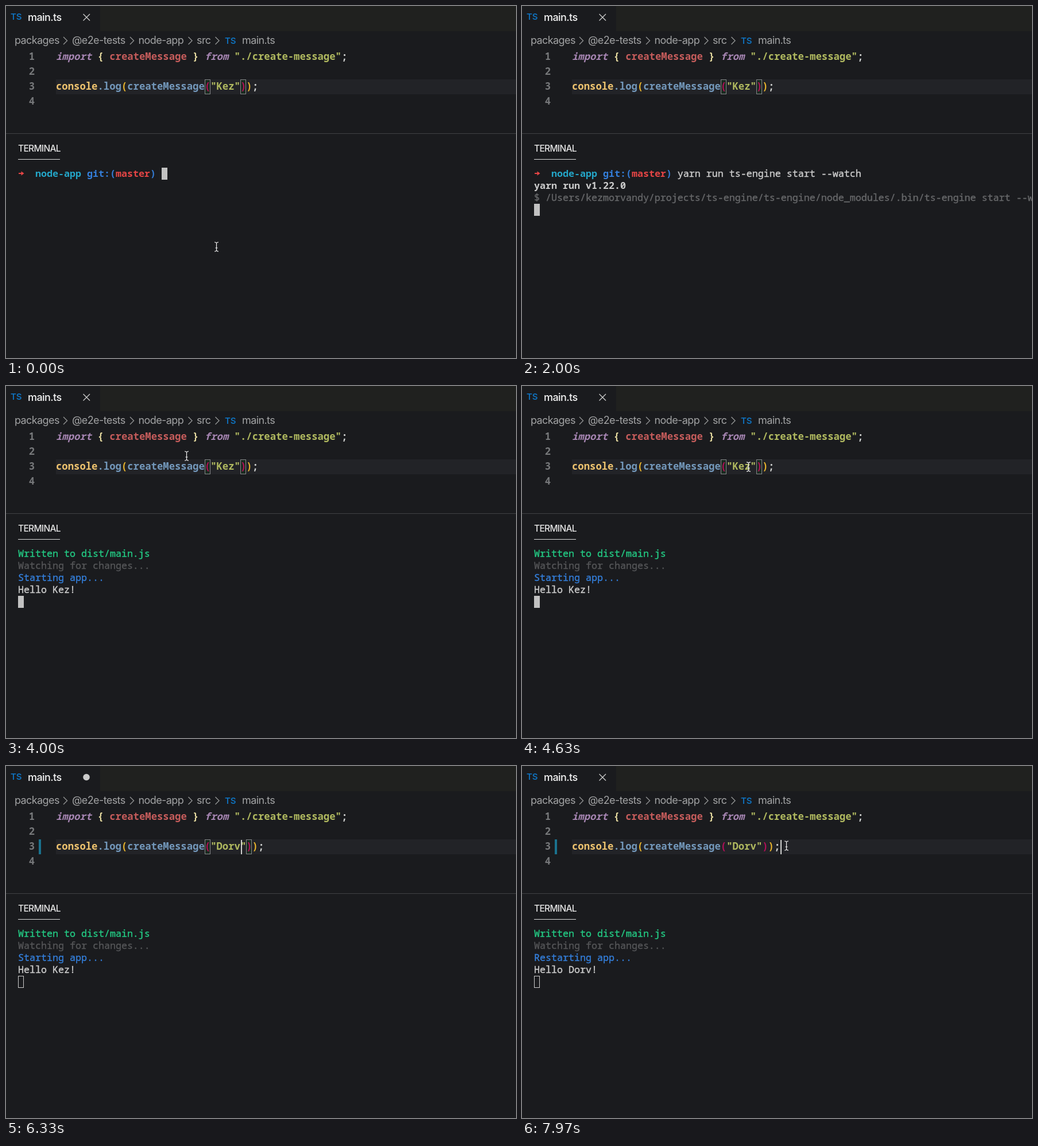
An HTML page that plays this animation: 888x614 px, repeating every 8 s.

```html
<!DOCTYPE html>
<html lang="en">
<head>
<meta charset="utf-8">
<title>Watch mode demo</title>
<style>
  html, body { margin: 0; width: 100%; height: 100%; overflow: hidden; background: #1a1b1e; }
  svg { display: block; width: 100%; height: 100%; }
  text { white-space: pre; }
  text, tspan, #arrow { fill: currentColor; }
  .ui { font: 18px Inter, sans-serif; letter-spacing: -.6px; color: #a2a3a4; }
  .tab { font-weight: 500; color: #f4f4f4; }
  .icon { font: 600 15px Inter, sans-serif; color: #0f71bd; }
  .panel { font: 500 15.5px Inter, sans-serif; letter-spacing: -.7px; color: #e4e4e4; }
  .code { font: 600 17.25px "Noto Sans Mono", monospace; color: #d0d2d1; }
  .term { font: 16.667px "Noto Sans Mono", monospace; color: #cccccc; }
  .term, .term tspan { stroke: currentColor; stroke-width: .4; }
  .num { color: #77797b; text-anchor: end; }
  .key { color: #a685b2; font-style: italic; }
  .brace { color: #e6dba0; }
  .var { color: #c55c5b; }
  .str { color: #b0b95f; }
  .obj { color: #efc46f; }
  .fn { color: #7398bb; }
  .outer { color: #e9b42c; }
  .inner { color: #b40f58; }
  .term .bold { font-weight: 700; stroke: none; }
  .red { color: #e54545; }
  .cyan { color: #24a6c8; }
  .blue { color: #347fdb; }
  .green { color: #23c983; }
  .dim { color: #666769; }
  .faint { color: #555658; }
  .line { fill: none; stroke: #c9c9c9; stroke-width: 1.4; }
</style>
</head>
<body>
<svg viewBox="0 0 888 614">
  <rect width="888" height="614" fill="#1a1b1e"/>
  <rect x="164" width="724" height="44" fill="#20211f"/>
  <text class="icon" x="8" y="24">TS</text>
  <text class="ui tab" x="38" y="26">main.ts</text>
  <path id="close" class="line" d="M134.500 14l11.500 11.500m0-11.500l-11.500 11.500"/>
  <circle id="unsaved" cx="140" cy="19.5" r="5.8" fill="#cbcbcb"/>
  <g id="crumbs"></g>

  <rect id="current" x="87" y="128" width="801" height="26" fill="#222327"/>
  <rect id="changed" x="57" y="128" width="4" height="26" fill="#1a728e"/>
  <rect id="selection" x="366.5" y="128" width="31.5" height="26" fill="#45474a"/>
  <g id="brackets" fill="#1b2a20" stroke="#85888a">
    <rect x="346.5" y="128.5" width="9" height="25"/>
    <rect id="closing" y="128.5" width="9" height="25"/>
  </g>
  <g id="numbers"></g>
  <text class="code" x="87" y="94"><tspan class="key">import</tspan> <tspan class="brace">{</tspan> <tspan class="var">createMessage</tspan> <tspan class="brace">}</tspan> <tspan class="key">from</tspan> <tspan class="str">"./create-message"</tspan>;</text>
  <text class="code" x="87" y="146"><tspan class="obj">console</tspan><tspan class="fn">.log</tspan><tspan class="outer">(</tspan><tspan class="fn">createMessage</tspan><tspan class="inner">(</tspan><tspan class="str" id="name"></tspan><tspan class="inner">)</tspan><tspan class="outer">)</tspan>;</text>
  <path id="bulb" fill="#f4b711" d="M102 116.500C98 113 98 110 98.200 109a6.800 6.800 0 0 1 13.600 0C112 111 111.500 113.500 108 116.500V121q0 1.500-1.500 1.500h-3q-1.500 0-1.500-1.500zM103.500 117.500v1.200h3v-1.200z" fill-rule="evenodd"/>
  <rect id="caret" y="129" width="2" height="25" fill="#d0d0ce"/>

  <rect y="222" width="888" height="1" fill="#414244"/>
  <text class="panel" x="21" y="254">TERMINAL</text>
  <rect x="21" y="267" width="73" height="1" fill="#dedede"/>
  <g id="screen"></g>
  <path id="arrow" class="red" d="M22 291h4.500v-2.800l5 3.800-5 3.800V293H22z"/>
  <g id="spinner" fill="#2999c9"></g>
  <rect id="block"/>
  <path id="mouse" fill="none" stroke="#f2f2f2" stroke-width="1.200" d="M-3.500-8Q0-8 0-5.500Q0-8 3.500-8M0-6V6M-3.500 8Q0 8 0 5.500Q0 8 3.500 8M-2 2H2"/>
</svg>
<script>
const LOOP = 8000, CELL = 10.35, LEFT = 87;
const FIRST = "Kez", SECOND = "Dorv";
const $ = id => document.getElementById(id);
const show = (id, on) => { $(id).style.display = on ? "" : "none"; };
const set = (id, attrs) => { for (const k in attrs) $(id).setAttribute(k, attrs[k]); };
const span = (cls, s) => `<tspan class="${cls}">${s}</tspan>`;
const within = (t, a, b) => t >= a && t < b;
const latest = (steps, t) => steps.filter(s => s[0] <= t).pop();

$("crumbs").innerHTML =
  [[15, "packages"], [115, "@e2e-tests"], [230.5, "node-app"], [332, "src"], [411, "main.ts"]]
    .map(([x, s]) => `<text class="ui" x="${x}" y="66">${s}</text>`).join("") +
  [100, 216, 317.5, 364.5]
    .map(x => `<path class="line" style="stroke:#929394" d="M${x} 54l6.500 6.500-6.500 6.500"/>`).join("") +
  `<text class="icon" x="381" y="66">TS</text>`;
$("numbers").innerHTML = [1, 2, 3, 4]
  .map(n => `<text class="code num" x="50" y="${68 + 26 * n}">${n}</text>`).join("");

const prompt = "   " + span("bold cyan", "node-app") + " " + span("bold blue", "git:(") +
  span("bold red", "master") + span("bold blue", ")") + " ";
const command = prompt + "yarn run ts-engine start --watch";
const yarn = span("bold", "yarn run v1.22.0");
const script = span("dim", "$ /Users/kezmorvandy/projects/ts-engine/ts-engine/node_modules/.bin/ts-engine start --watch");
const building = [span("green", "  Building bundle")];
const built = verb => [span("green", "Written to dist/main.js"),
  span("faint", "Watching for changes..."), span("blue", verb + " app...")];

// time, lines, cursor row, cursor column
const screens = [
  [0, [prompt], 0, 25],
  [400, [command], 0, 57],
  [950, [command], 1, 0],
  [1200, [command, yarn], 2, 0],
  [1330, [command, yarn, script], 3, 0],
  [2560, building],
  [3380, built("Starting"), 3, 0],
  [3500, [...built("Starting"), `Hello ${FIRST}!`], 4, 0],
  [6760, building],
  [7080, built("Restarting"), 3, 0],
  [7250, [...built("Restarting"), `Hello ${SECOND}!`], 4, 0]
];

// time, name, caret column
const SELECT = 4800, TYPE = 5480, SAVE = 6600, CLICK = 7700;
const edits = [
  [0, FIRST], [SELECT, FIRST, 30],
  ...[...SECOND].map((c, i) => [TYPE + i * 155, SECOND.slice(0, i + 1), 28 + i]),
  [CLICK, SECOND, 35]
];

// time, x, y
const paths = [
  [[0, 366.5, 420], [400, 366.5, 420]],
  [[3580, 366.5, 420], [3960, 314.5, 122], [4250, 314.5, 122], [4650, 395, 141], [TYPE, 395, 141]],
  [[7300, 395, 141], [7600, 460.5, 139], [LOOP, 460.5, 139]]
];

function drawMouse(t) {
  const path = paths.find(p => within(t, p[0][0], p[p.length - 1][0]));
  show("mouse", path);
  if (!path) return;
  const i = path.findIndex(p => p[0] > t);
  const [t0, x0, y0] = path[i - 1], [t1, x1, y1] = path[i];
  const u = (t - t0) / (t1 - t0), e = u * u * (3 - 2 * u);
  set("mouse", { transform: `translate(${x0 + (x1 - x0) * e} ${y0 + (y1 - y0) * e})` });
}

function drawEditor(t) {
  const [since, name, column] = latest(edits, t);
  const selected = within(t, SELECT, TYPE), dirty = within(t, TYPE, SAVE);
  $("name").textContent = `"${name}"`;
  show("close", !dirty);
  show("unsaved", dirty);
  show("changed", t >= TYPE);
  show("current", !selected);
  show("selection", selected);
  show("bulb", within(t, 5000, TYPE));
  show("brackets", !selected && t < CLICK);
  set("closing", { x: Math.round(LEFT + (28 + name.length) * CELL) + .5 });
  show("caret", column && (t - since) % 1000 < 500);
  if (column) set("caret", { x: Math.round(LEFT + column * CELL + .7) });
}

// dots per spinner step, numbered down the left column, then the right
const spins = ["013", "034", "0345", "345", "2345", "245", "1245", "0125", "012", "0123"];
let shown;
function drawTerminal(t) {
  const screen = latest(screens, t), [, lines, row, column] = screen;
  if (screen !== shown) {
    shown = screen;
    $("screen").innerHTML = lines
      .map((s, i) => `<text class="term" x="21" y="${298 + 21 * i}">${s}</text>`).join("");
  }
  const busy = lines === building;
  show("arrow", t < 2560);
  show("spinner", busy);
  show("block", !busy);
  if (busy) {
    $("spinner").innerHTML = [...spins[Math.floor((t + 240) / 80) % 10]]
      .map(d => `<circle cx="${d > 2 ? 29 : 25}" cy="${288 + d % 3 * 4}" r="1.100"/>`).join("");
    return;
  }
  const x = 21 + column * 10, y = 282 + 21 * row;
  set("block", t < SELECT
    ? { x, y, width: 10, height: 21, fill: "#c2c2c2", stroke: "none" }
    : { x: x + .5, y: y + .5, width: 9, height: 20, fill: "none", stroke: "#cccccc" });
}

function frame() {
  const t = performance.now() % LOOP;
  drawEditor(t);
  drawTerminal(t);
  drawMouse(t);
  requestAnimationFrame(frame);
}
frame();
</script>
</body>
</html>
```
